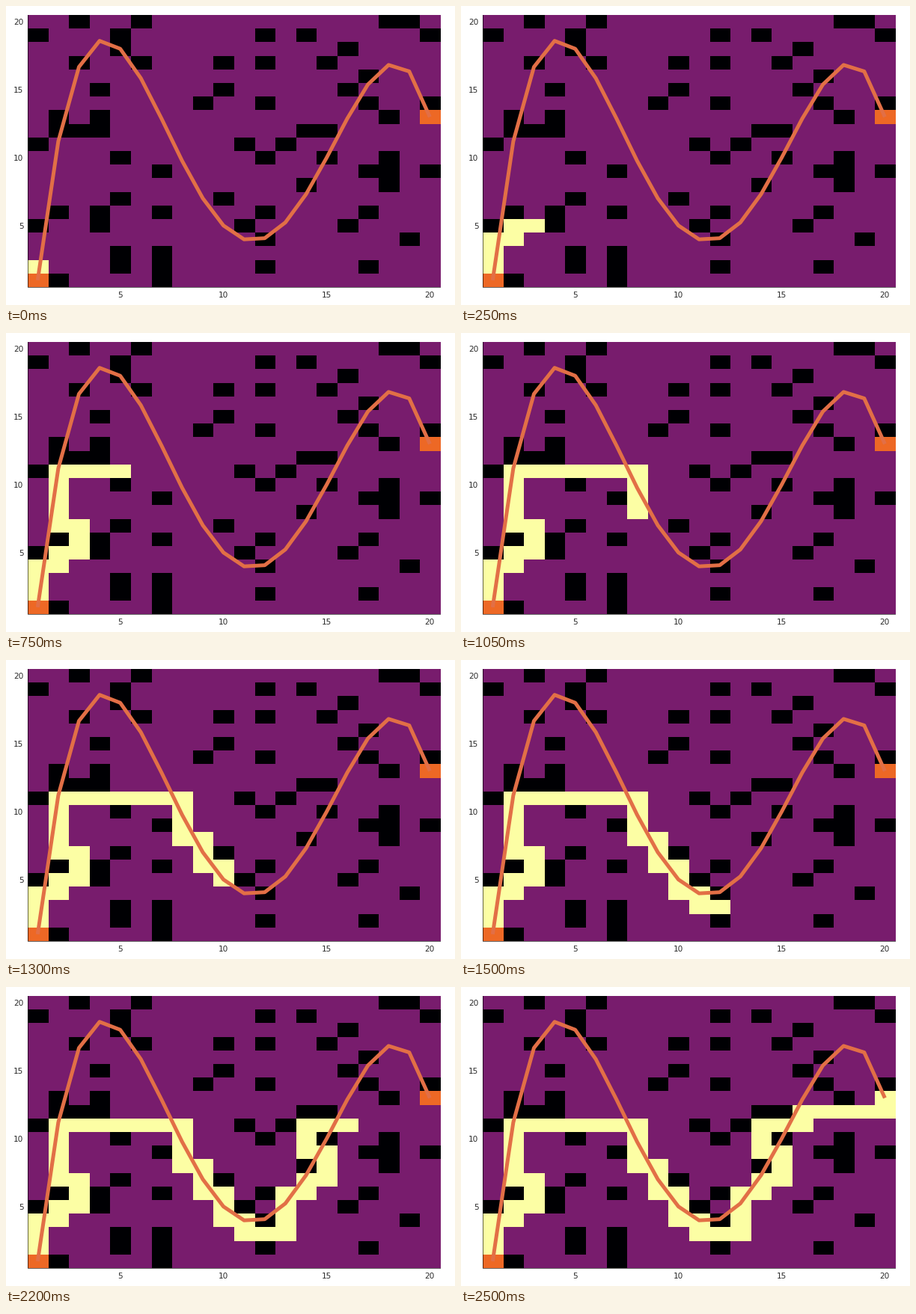
Animation, 600 px wide and 400 px high, one loop 2.55 s. Source, as a matplotlib script:

```python
import numpy as np
import matplotlib.pyplot as plt
from matplotlib.animation import FuncAnimation

W, H, DPI = 600, 400, 100
PX = 72 / DPI
N = 20
LEFT, RIGHT, TOP, BOTTOM = 28.5, 580.2, 12, 376
CELL_W, CELL_H = (RIGHT - LEFT) / N, (BOTTOM - TOP) / N
WALL, FREE, GOAL, TRAIL = range(4)

# Columns of the walls, one entry per row from the bottom up
WALLS = [
    (2, 7), (5, 7, 12, 17), (5, 7), (12, 19), (1, 4, 11, 16),
    (2, 4, 7, 12, 17), (5, 10), (14, 18), (7, 17, 18, 20), (5, 12, 15, 18),
    (1, 11, 13), (2, 3, 4, 14, 15), (2, 4, 18), (9, 12, 17, 20), (4, 10, 16),
    (17,), (3, 6, 10, 12, 15), (5, 16), (1, 5, 12, 14, 20), (3, 6, 18, 19),
]
START, END = (1, 1), (20, 13)
MOVES = "UURURUULUUUURRRRRRDDDRDDRDDRDRRUUURURUULUURRURRRRU"
STEP = {"U": (0, 1), "D": (0, -1), "L": (-1, 0), "R": (1, 0)}


def px(x):
    return LEFT + (x - 0.5) * CELL_W


def py(y):
    return BOTTOM - (y - 0.5) * CELL_H


def build_maze():
    maze = np.full((N, N), FREE)
    for row, cols in enumerate(WALLS):
        maze[row, np.array(cols) - 1] = WALL
    for x, y in (START, END):
        maze[y - 1, x - 1] = GOAL
    return maze


def build_path():
    path = [(1, 2)]
    for move in MOVES:
        dx, dy = STEP[move]
        x, y = path[-1]
        path.append((x + dx, y + dy))
    return path


maze, path = build_maze(), build_path()

fig = plt.figure(figsize=(W / DPI, H / DPI), dpi=DPI, facecolor="white")
ax = fig.add_axes([0, 0, 1, 1])
ax.axis("off")
image = ax.imshow(maze, cmap="inferno", vmin=WALL, vmax=TRAIL, origin="lower",
                  extent=(LEFT, RIGHT, BOTTOM, TOP), aspect="auto",
                  interpolation="nearest")
ax.set_xlim(0, W)
ax.set_ylim(H, 0)

# Quartic curve sampled at every column
xs = np.arange(1, N + 1)
samples = [1, 11.2, 16.7, 18.6, 18, 15.8, 12.95, 9.8, 7, 5,
           4, 4.1, 5.25, 7.35, 10, 12.85, 15.4, 16.85, 16.35, 13]
curve = np.polyval(np.polyfit(xs, samples, 4), xs)
ax.plot(px(xs), py(curve), color="#E26F46", lw=5 * PX,
        solid_capstyle="butt", solid_joinstyle="round")

ax.plot([LEFT, LEFT, RIGHT], [TOP, BOTTOM, BOTTOM], color="black",
        alpha=0.6, lw=PX)
font = dict(family="DejaVu Sans", size=10.5 * PX, color="#2b2b2b",
            va="baseline")
for tick in (5, 10, 15, 20):
    ax.text(px(tick), 390, str(tick), ha="center", **font)
    ax.text(23.5, py(tick) + 4, str(tick), ha="right", **font)


def draw(i):
    grid = maze.copy()
    for x, y in path[:i + 1]:
        grid[y - 1, x - 1] = TRAIL
    image.set_data(grid)
    return image,


anim = FuncAnimation(fig, draw, frames=len(path), interval=50,
                     init_func=lambda: draw(0), repeat=True, repeat_delay=0)
plt.show()
```
